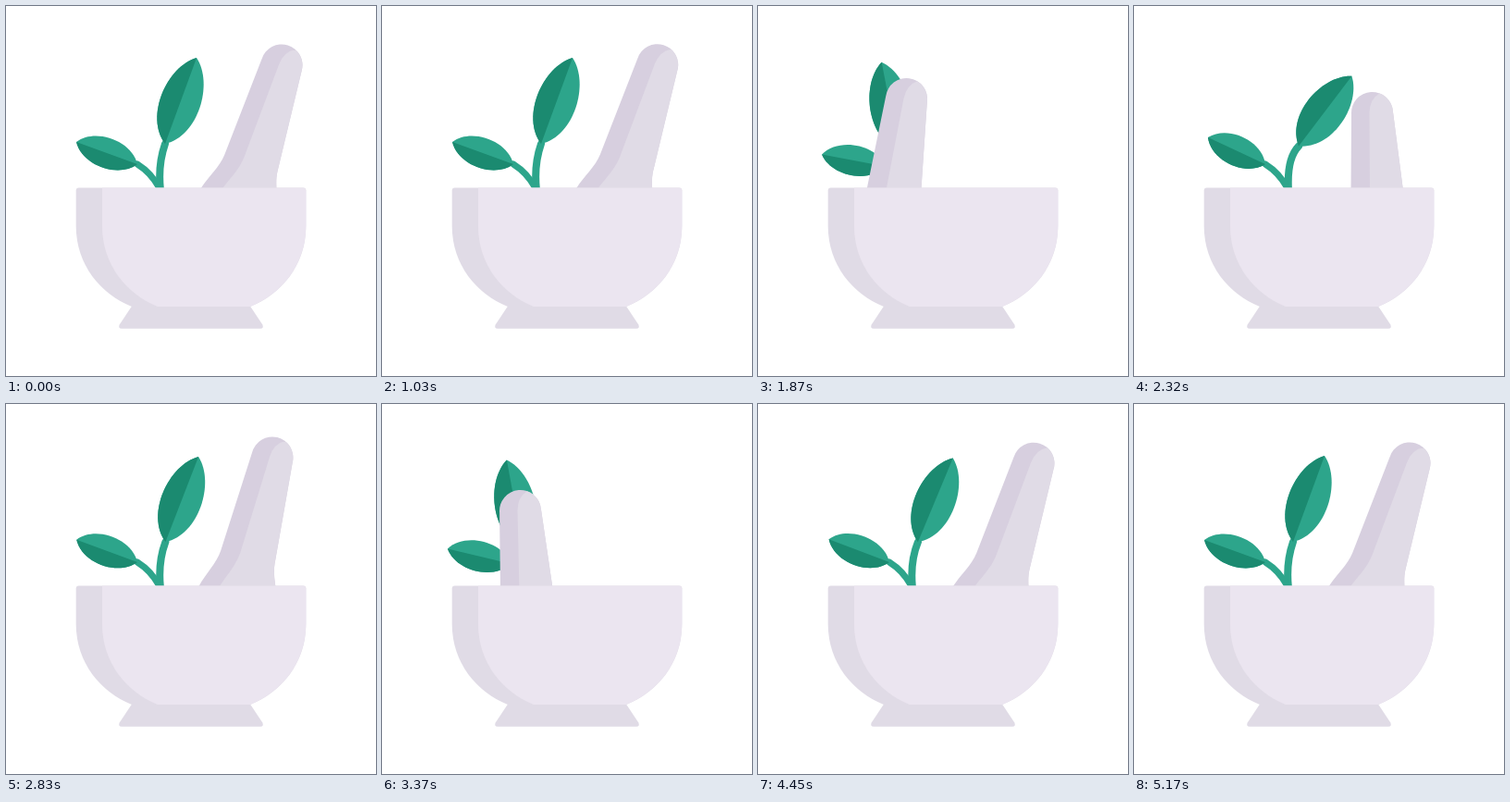
An HTML page with a canvas that plays this animation: 400x400 px, repeating every 5.2 s.

```html
<!DOCTYPE html>
<html lang="en">
<head>
<meta charset="utf-8">
<title>Mortar and pestle</title>
<style>
html, body { margin: 0; width: 100%; height: 100%; overflow: hidden; background: #fff; }
canvas { display: block; width: 400px; height: 400px; }
</style>
</head>
<body>
<canvas id="stage"></canvas>
<script>
const LOOP = 5200, START = 1030, STEP = 30, RIM = 197;
const COLOR = {
  leaf: '#2da58b', leafDark: '#1b8a70',
  bowl: '#ebe5f0', shade: '#e0dbe6', pestleDark: '#d7cfdf'
};

const canvas = document.getElementById('stage');
const ratio = window.devicePixelRatio || 1;
canvas.width = canvas.height = 400 * ratio;
const ctx = canvas.getContext('2d');

const pose = (time, x, y, tilt) => ({ time, x, y, tilt });
const path = [
  pose(1000, 298, 64, 17.4),     // at rest
  pose(1510, 241, 27.5, 17.4),   // lifted
  pose(1870, 160.5, 100.5, 7.7), // down on the left
  pose(2320, 257.5, 115.5, -3.5),
  pose(2800, 289, 57.5, 14),     // lifted again
  pose(3370, 149.5, 115.5, -4.5),
  pose(3660, 149, 115.5, -4.5),
  pose(3910, 280, 92.5, 7.2),
  pose(4480, 298, 64, 17.4)
];

// When the plant is pushed to the left, and when it is let go
const pushes = [
  { start: 1540, release: 2050 },
  { start: 3130, release: 3700 }
];

// Smooth interpolation that never overshoots its poses
function sample(t, key) {
  const last = path.length - 1;
  if (t <= path[0].time) return path[0][key];
  if (t >= path[last].time) return path[last][key];
  const chord = i => (path[i + 1][key] - path[i][key]) / (path[i + 1].time - path[i].time);
  const slope = i => {
    if (i === 0 || i === last) return 0;
    const a = chord(i - 1), b = chord(i);
    return a * b > 0 ? 2 * a * b / (a + b) : 0;
  };
  let i = 0;
  while (t >= path[i + 1].time) i++;
  const span = path[i + 1].time - path[i].time;
  const u = (t - path[i].time) / span, v = 1 - u;
  return v * v * (1 + 2 * u) * path[i][key] + u * u * (3 - 2 * u) * path[i + 1][key]
    + u * v * span * (v * slope(i) - u * slope(i + 1));
}

function ease(t, from, duration) {
  const u = Math.min(Math.max((t - from) / duration, 0), 1);
  return u * u * (3 - 2 * u);
}

// Pushed left by depth, snaps right to 1, swings back a little too far, settles
function flex(t, depth, pushTime) {
  const over = 0.35;
  return pushes.reduce((bend, { start, release }) => bend
    - depth * ease(t, start, pushTime)
    + (depth + 1) * ease(t, release, 220)
    - (1 + over) * ease(t, release + 350, 680)
    + over * ease(t, release + 1050, 400), 0);
}

const rad = deg => deg * Math.PI / 180;

function fill(color, draw) {
  ctx.beginPath();
  draw();
  ctx.closePath();
  ctx.fillStyle = color;
  ctx.fill();
}

function stem(width, cx, cy, x, y) {
  ctx.beginPath();
  ctx.moveTo(167, 199);
  ctx.quadraticCurveTo(cx, cy, x, y);
  ctx.lineWidth = width;
  ctx.lineCap = 'round';
  ctx.strokeStyle = COLOR.leaf;
  ctx.stroke();
}

// A leaf growing upwards from its base, tilted clockwise, dark on its left
function leaf(x, y, tilt, length, baseBelly, tipBelly) {
  ctx.save();
  ctx.translate(x, y);
  ctx.rotate(rad(tilt));
  const left = () => {
    ctx.moveTo(0, 0);
    ctx.bezierCurveTo(-baseBelly, -0.2 * length, -tipBelly, -0.8 * length, 0, -length);
  };
  fill(COLOR.leaf, () => {
    left();
    ctx.bezierCurveTo(tipBelly, -0.8 * length, baseBelly, -0.2 * length, 0, 0);
  });
  fill(COLOR.leafDark, left);
  ctx.restore();
}

function plant(tall, small) {
  const r = Math.max(tall, 0), l = Math.max(-tall, 0);
  const x = 172 + 6 * r - 20 * l, y = 149 + 2.5 * r + 7 * l;
  stem(8, 164 + r - 2 * l, 172 - 7 * r, x, y);

  const drop = Math.max(-small, 0), lift = Math.max(small, 0);
  const sx = 142 - 4 * drop, sy = 171 + 2.5 * drop;
  stem(7, 158 - drop, 181, sx, sy);

  leaf(x, y, 20.1 + 17.1 * r - 31 * l, 99 - 4 * r - 2 * l, 31, 27);
  leaf(sx, sy, -70 + 5 * lift - 9.7 * drop, 70.2 - 1.7 * lift, 21.7, 21.7);
}

function pestle(x, y, tilt) {
  ctx.save();
  ctx.translate(x, y);
  ctx.rotate(rad(tilt));
  const rightSide = () => {
    ctx.lineTo(30, 111);
    ctx.bezierCurveTo(31.5, 130, 46, 147, 46, 170);
    ctx.bezierCurveTo(46, 200, 25, 215, 0, 215);
  };
  fill(COLOR.pestleDark, () => {
    ctx.arc(0, 0, 22.5, Math.PI, 0);
    rightSide();
    ctx.bezierCurveTo(-25, 215, -46, 200, -46, 170);
    ctx.bezierCurveTo(-46, 147, -31.5, 130, -30, 111);
  });
  fill(COLOR.shade, () => {
    ctx.moveTo(-3, 0);
    ctx.quadraticCurveTo(-2, -15, 9, -20.6);
    ctx.arc(0, 0, 22.5, -1.16, 0);
    rightSide();
    ctx.bezierCurveTo(-14, 208, -26, 190, -26, 170);
    ctx.bezierCurveTo(-26, 147, -11, 130, -9, 108);
  });
  ctx.restore();
}

function bowlShape(left, corner, foot) {
  ctx.moveTo(left, 196.5 + corner);
  ctx.quadraticCurveTo(left, 196.5, left + corner, 196.5);
  ctx.lineTo(321.5, 196.5);
  ctx.quadraticCurveTo(324.3, 196.5, 324.3, 199.5);
  ctx.lineTo(324.3, 238);
  ctx.bezierCurveTo(324.3, 280, 297, 312, 264, 325);
  ctx.lineTo(foot, 325);
  ctx.bezierCurveTo(foot - 33, 312, left, 280, left, 238);
}

function mortar() {
  fill(COLOR.shade, () => {
    ctx.moveTo(136, 324.5);
    ctx.lineTo(264, 324.5);
    ctx.lineTo(277.3, 344.5);
    ctx.quadraticCurveTo(279, 348.7, 275, 348.7);
    ctx.lineTo(125, 348.7);
    ctx.quadraticCurveTo(121, 348.7, 122.7, 344.5);
  });
  fill(COLOR.shade, () => bowlShape(75.7, 3, 136));
  fill(COLOR.bowl, () => bowlShape(104, 0, 164));
}

function draw(time) {
  const t = START + Math.floor((time - START) / STEP) * STEP;
  ctx.setTransform(ratio, 0, 0, ratio, 0, 0);
  ctx.fillStyle = '#fff';
  ctx.fillRect(0, 0, 400, 400);
  ctx.save();
  ctx.beginPath();
  ctx.rect(0, 0, 400, RIM);
  ctx.clip();
  plant(flex(t, 1, 300), flex(t, 1.7, 600));
  pestle(sample(t, 'x'), sample(t, 'y'), sample(t, 'tilt'));
  ctx.restore();
  mortar();
}

const begin = performance.now();
function tick() {
  draw((performance.now() - begin) % LOOP);
  requestAnimationFrame(tick);
}
tick();
</script>
</body>
</html>
```
